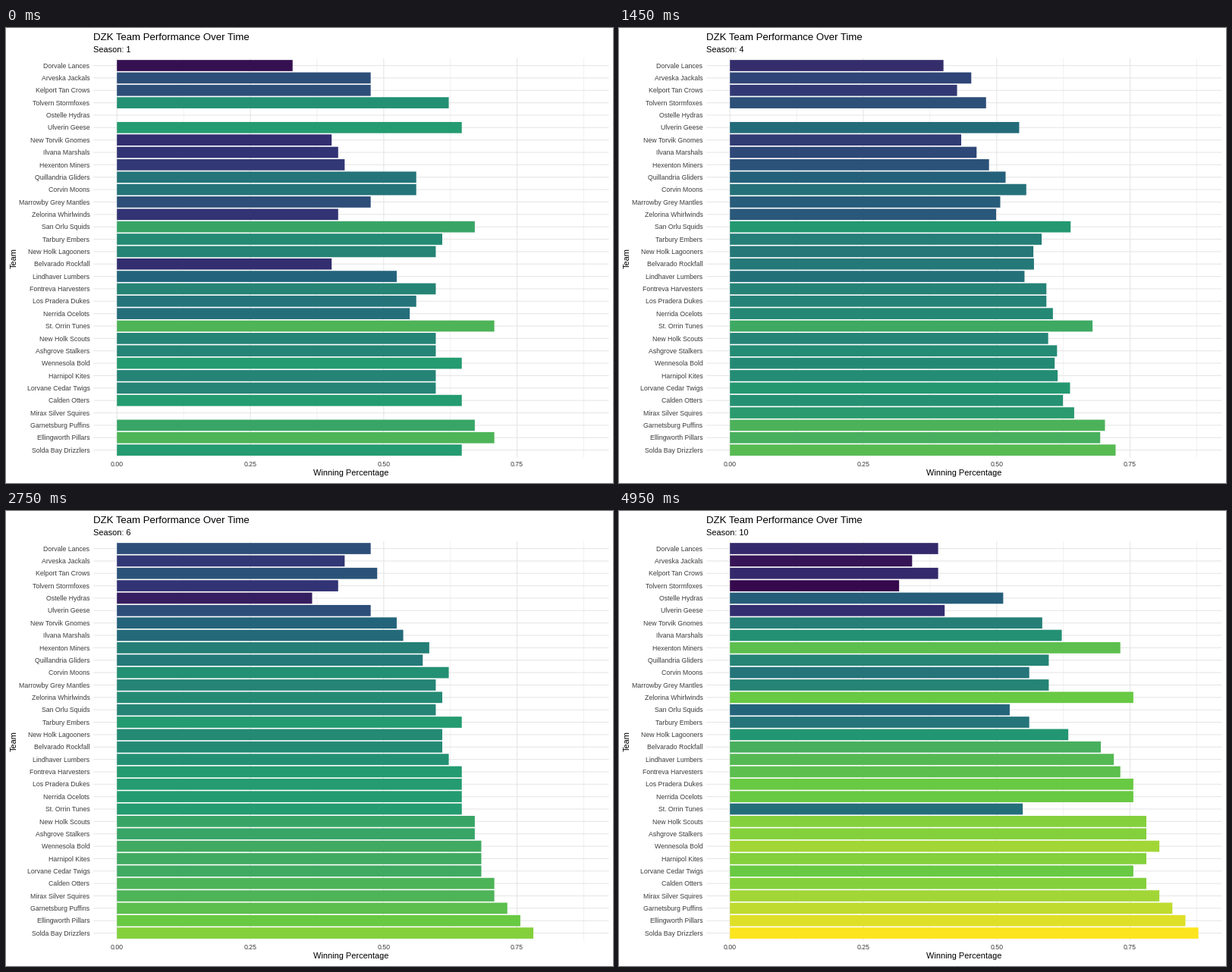
These frames come from a looping animation (800x600 px, 5000 ms). A matplotlib script:

```python
import math

import matplotlib.pyplot as plt
import numpy as np
from matplotlib.animation import FuncAnimation

plt.rcParams["font.family"] = "Liberation Sans"

W, H, DPI = 800, 600, 100
STEPS = 11                # frames from one season to the next
SEASONS = 10
GAMES = 82
LEFT, RIGHT, TOP, BOTTOM = 115.3, 794.5, 39.7, 566.4
X0, UNIT = 146.2, 703.2   # pixel of zero and pixels per 1.0
NONE = math.nan

# Wins in seasons 1 to 4, top row first
EARLY = {
    "Dorvale Lances": (27, 24, 29, 35),
    "Arveska Jackals": (39, 36, 39, 36),
    "Kelport Tan Crows": (39, 33, 33, 36),
    "Tolvern Stormfoxes": (51, 46, 40, 39),
    "Ostelle Hydras": (NONE,) * 4,
    "Ulverin Geese": (53, 50, 47, 43),
    "New Torvik Gnomes": (33, 34, 33, 37),
    "Ilvana Marshals": (34, 34, 36, 39),
    "Hexenton Miners": (35, 30, 36, 42),
    "Quillandria Gliders": (46, 44, 43, 42),
    "Corvin Moons": (46, 42, 43, 47),
    "Marrowby Grey Mantles": (39, 43, 39, 43),
    "Zelorina Whirlwinds": (34, 42, 39, 42),
    "San Orlu Squids": (55, 54, 53, 52),
    "Tarbury Embers": (50, 48, 46, 49),
    "New Holk Lagooners": (49, 50, 46, 47),
    "Belvarado Rockfall": (33, 39, 48, 46),
    "Lindhaver Lumbers": (43, 46, 44, 46),
    "Fontreva Harvesters": (49, 51, 48, 49),
    "Los Pradera Dukes": (46, 43, 48, 49),
    "Nerrida Ocelots": (45, 46, 49, 50),
    "St. Orrin Tunes": (58, 58, 57, 55),
    "New Holk Scouts": (49, 50, 47, 50),
    "Ashgrove Stalkers": (49, 51, 49, 51),
    "Wennesola Bold": (53, 49, 48, 51),
    "Harnipol Kites": (49, 50, 51, 50),
    "Lorvane Cedar Twigs": (49, 50, 51, 53),
    "Calden Otters": (53, 49, 48, 53),
    "Mirax Silver Squires": (NONE, NONE, 51, 54),
    "Garnetsburg Puffins": (55, 56, 57, 58),
    "Ellingworth Pillars": (58, 59, 55, 58),
    "Solda Bay Drizzlers": (53, 53, 58, 60),
}

# Wins in seasons 5, 6, 7 and 10; uneven runs also give 8 and 9
LATE = [
    (37, 39, 37, 32), (35, 35, 34, 28), (39, 40, 38, 32), (38, 34, 32, 26),
    (NONE, 30, 36, 42), (40, 39, 37, 33), (40, 43, 44, 48), (42, 44, 45, 51),
    (43, 48, 50, 54, 58, 60), (46, 47, 46, 49),
    (48, 51, 50, 49, 47, 46), (47, 49, 49, 51, 50, 49),
    (46, 50, 54, 58, 60, 62), (47, 49, 47, 45, 45, 43),
    (50, 53, 51, 46), (49, 50, 49, 52), (48, 50, 51, 57), (49, 51, 53, 59),
    (50, 53, 55, 60), (51, 53, 54, 58, 60, 62),
    (51, 53, 54, 58, 60, 62), (54, 53, 51, 45),
    (53, 55, 57, 59, 62, 64), (53, 55, 57, 59, 62, 64),
    (53, 56, 59, 66), (54, 56, 58, 64), (55, 56, 57, 59, 60, 62),
    (55, 58, 57, 59, 62, 64), (56, 58, 59, 66), (58, 60, 62, 68),
    (60, 62, 64, 70), (62, 64, 66, 72),
]


def away(d):
    """Round away from zero."""
    return math.copysign(math.ceil(abs(d)), d)


def full_run(row):
    """Fill in seasons 8 and 9 where they follow an even pace."""
    if len(row) == 6:
        return row
    *start, end = row
    s8 = start[-1] + away((end - start[-1]) / 3)
    s9 = s8 + away((end - s8) / 2)
    return (*start, s8, s9, end)


wins = np.array([e + full_run(l) for e, l in zip(EARLY.values(), LATE)], float)

# Colours blend in cube-root XYZ, then pass to a gamma 1.8 display space
XYZ = np.array([[0.4124, 0.3576, 0.1805],
                [0.2126, 0.7152, 0.0722],
                [0.0193, 0.1192, 0.9505]])
DISPLAY = np.array([[0.9749, 0.0272, -0.0019],
                    [-0.0200, 1.0543, -0.0344],
                    [0.0017, 0.0017, 0.9969]])
VIRIDIS = ["#440154", "#414487", "#2A788E", "#22A884", "#7AD151", "#FDE725"]


def to_blend(color):
    c = np.array(plt.matplotlib.colors.to_rgb(color))
    linear = np.where(c <= 0.04045, c / 12.92, ((c + 0.055) / 1.055) ** 2.4)
    return np.cbrt(XYZ @ linear)


def to_display(blend):
    linear = blend ** 3 @ np.linalg.inv(XYZ).T
    return np.clip(linear @ DISPLAY.T, 0, 1) ** (1 / 1.8)


def ramp(values):
    stops = np.array([to_blend(c) for c in VIRIDIS])
    low, high = np.nanmin(values), np.nanmax(values)
    t = (values - low) / (high - low)
    grid = np.linspace(0, 1, len(stops))
    return np.stack([np.interp(t, grid, s) for s in stops.T], axis=-1)


fills = ramp(wins)
GREY = to_display(to_blend("#4D4D4D"))
GRID = to_display(to_blend("#EBEBEB"))

fig = plt.figure(figsize=(W / DPI, H / DPI), dpi=DPI, facecolor="white")
ax = fig.add_axes([0, 0, 1, 1])
ax.set(xlim=(0, W), ylim=(H, 0))
ax.axis("off")


def points(px):
    return px * 72 / DPI


def label(x, y, text, size, color="black", ha="left", **kw):
    return ax.text(x, y, text, fontsize=points(size), color=color, ha=ha,
                   va="baseline", **kw)


def grid_lines(draw, at, start, stop, width):
    draw(at, start, stop, colors=[GRID], lw=points(width), snap=False, zorder=1)


pitch = (BOTTOM - TOP) / (len(EARLY) + 0.2)
rows = TOP + pitch * (0.6 + np.arange(len(EARLY)))
ticks = np.arange(4) * 0.25

grid_lines(ax.vlines, X0 + UNIT * (ticks + 0.125), TOP, BOTTOM, 0.53)
grid_lines(ax.hlines, rows, LEFT, RIGHT, 1.07)
grid_lines(ax.vlines, X0 + UNIT * ticks, TOP, BOTTOM, 1.07)

bars = ax.barh(rows, 0, height=0.9 * pitch, left=X0, lw=0, snap=False, zorder=3)
ax.set(xlim=(0, W), ylim=(H, 0))

for y, name in zip(rows, EARLY):
    label(110.4, y + 3.2, name, 8.8, GREY, "right")
for t in ticks:
    label(X0 + UNIT * t, 578, f"{t:.2f}", 8.8, GREY, "center")
label(LEFT, 16.2, "DZK Team Performance Over Time", 13.2)
season = label(LEFT, 32, "", 11)
label((LEFT + RIGHT) / 2, 590.3, "Winning Percentage", 11, ha="center")
label(13.6, (TOP + BOTTOM) / 2, "Team", 11, ha="center",
      rotation=90, rotation_mode="anchor")


def update(i):
    now, step = divmod(i, STEPS)
    nxt = min(now + 1, SEASONS - 1)
    f = step / STEPS
    lengths = UNIT / GAMES * ((1 - f) * wins[:, now] + f * wins[:, nxt])
    colors = to_display((1 - f) * fills[:, now] + f * fills[:, nxt])
    for bar, length, color in zip(bars, lengths, colors):
        shown = not math.isnan(length)
        bar.set_visible(shown)
        if shown:
            bar.set_width(length)
            bar.set_facecolor(color)
    season.set_text(f"Season: {int(i / STEPS + 1.5)}")
    return [*bars, season]


anim = FuncAnimation(fig, update, frames=STEPS * (SEASONS - 1) + 1,
                     init_func=lambda: update(0), interval=50, repeat=True)
plt.show()
```
